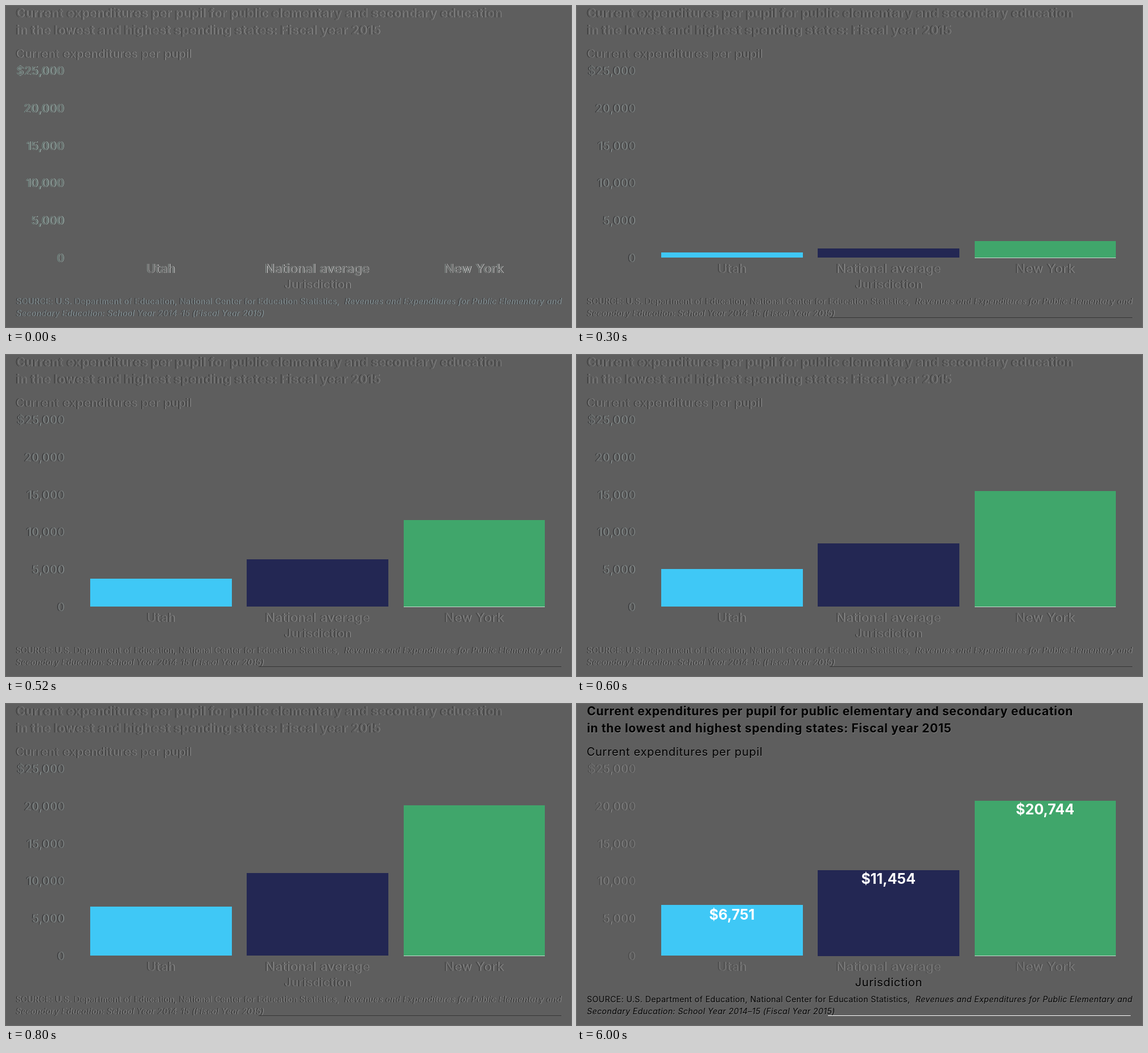
An HTML page for the animation above (6020 ms loop, 993 by 564 pixels).

```html
<!DOCTYPE html>
<html lang="en">
<head>
<meta charset="utf-8">
<title>Current expenditures per pupil</title>
<style>
  html, body { margin: 0; width: 100%; height: 100%; overflow: hidden; }
  body { position: relative; background: #5e5e5e; font: 20px Inter, "Open Sans", sans-serif; }
  div { position: absolute; }

  /* line-height 0 puts the middle of the capitals at the top coordinate */
  .text {
    line-height: 0; white-space: pre; letter-spacing: .7px; color: #5e5e5e;
    text-shadow: .7px .4px var(--light), -.7px -.4px var(--dark);
  }
  .title { font-size: 21px; font-weight: 700; letter-spacing: .66px; }
  .axis { right: 890px; }
  .category { font-size: 22px; letter-spacing: .55px; }
  .source { font-size: 14px; letter-spacing: .44px; }
  .center { transform: translateX(-50%); }
  .value { font-size: 25px; font-weight: 700; line-height: 0; color: #fff; }
  #rule { left: 444px; top: 547px; width: 532px; height: 1px; background: #363636; }
  #base { left: 699px; top: 441.5px; width: 247.5px; height: 1px; background: #c4dfce; }

  .text { --light: #999; --dark: #252525; }
  .axis { --light: #a4b4b5; --dark: #202326; }
  .category { --light: #aaa; --dark: #303030; }

  .start .text { --light: #a9a9a9; --dark: #333; }
  .start .axis { --light: #c5ebe2; --dark: #81aaa0; }
  .start .category { --light: #fff; --dark: #9eada8; }
  .start .source { --light: #9bb5bd; --dark: #303538; }
  .start #rule { display: none; }

  .end .solid { color: #000; text-shadow: .5px .5px #858585; }
  .end .axis, .end .category { --light: #a0a0a0; --dark: #3d3d3d; }
  .end #rule { left: 441px; background: #fff; }
</style>
</head>
<body>
<script>
const LOOP = 6020, STEP = 20, GROW = 1000, BASE = 442.5;
const bars = [
  { x: 148, width: 248.5, height: 89.3, color: "#3fc8f6", name: "Utah", value: "$6,751", valueY: 370 },
  { x: 423, width: 248.5, height: 150.5, color: "#232753", name: "National average", value: "$11,454", valueY: 307 },
  { x: 699, width: 247.5, height: 273, color: "#40a66b", name: "New York", value: "$20,744", valueY: 185 }
];

function add(className, style, html = "") {
  const el = document.createElement("div");
  el.className = className;
  el.innerHTML = html;
  for (const key in style) {
    const v = style[key];
    el.style[key] = typeof v === "number" ? v + "px" : v;
  }
  document.body.append(el);
  return el;
}

const line = (className, left, top, html) => add("text " + className, { left, top }, html);

line("title solid", 17.5, 13, "Current expenditures per pupil for public elementary and secondary education");
line("title solid", 17.5, 43, "in the lowest and highest spending states: Fiscal year 2015");
line("solid", 17, 84, "Current expenditures per pupil");

["$25,000", "20,000", "15,000", "10,000", "5,000", "0"].forEach((label, i) =>
  add("text axis", { top: 114 + i * 65.8 }, label));

for (const bar of bars) {
  const middle = bar.x + bar.width / 2;
  bar.el = add("", { left: bar.x, width: bar.width, background: bar.color });
  bar.label = add("value center", { left: middle, top: bar.valueY }, bar.value);
  line("category center", middle, 460.5, bar.name);
}
const base = add("", {});
base.id = "base";

line("solid center", 548, 489, "Jurisdiction");
line("source solid", 17.5, 519, "SOURCE: U.S. Department of Education, National Center for Education Statistics,");
line("source solid", 595, 519, "<i>Revenues and Expenditures for Public Elementary and</i>");
line("source solid", 17.5, 540, "<i>Secondary Education: School Year 2014–15 (Fiscal Year 2015)</i>");
add("", {}).id = "rule";

const easeInOut = u => u < .5 ? 4 * u ** 3 : 1 - 4 * (1 - u) ** 3;

function draw(time) {
  const t = Math.floor(time % LOOP / STEP) * STEP;
  const grown = t < 60 ? 0 : easeInOut(Math.min(t / GROW, 1));
  document.body.className = t < 60 ? "start" : t >= 6000 ? "end" : "";
  for (const { el, label, height } of bars) {
    el.style.top = BASE - height * grown + "px";
    el.style.height = height * grown + "px";
    label.hidden = t < 1020;
  }
  base.hidden = t < 100;
}

const began = performance.now();
function tick() {
  draw(performance.now() - began);
  requestAnimationFrame(tick);
}
tick();
</script>
</body>
</html>
```
